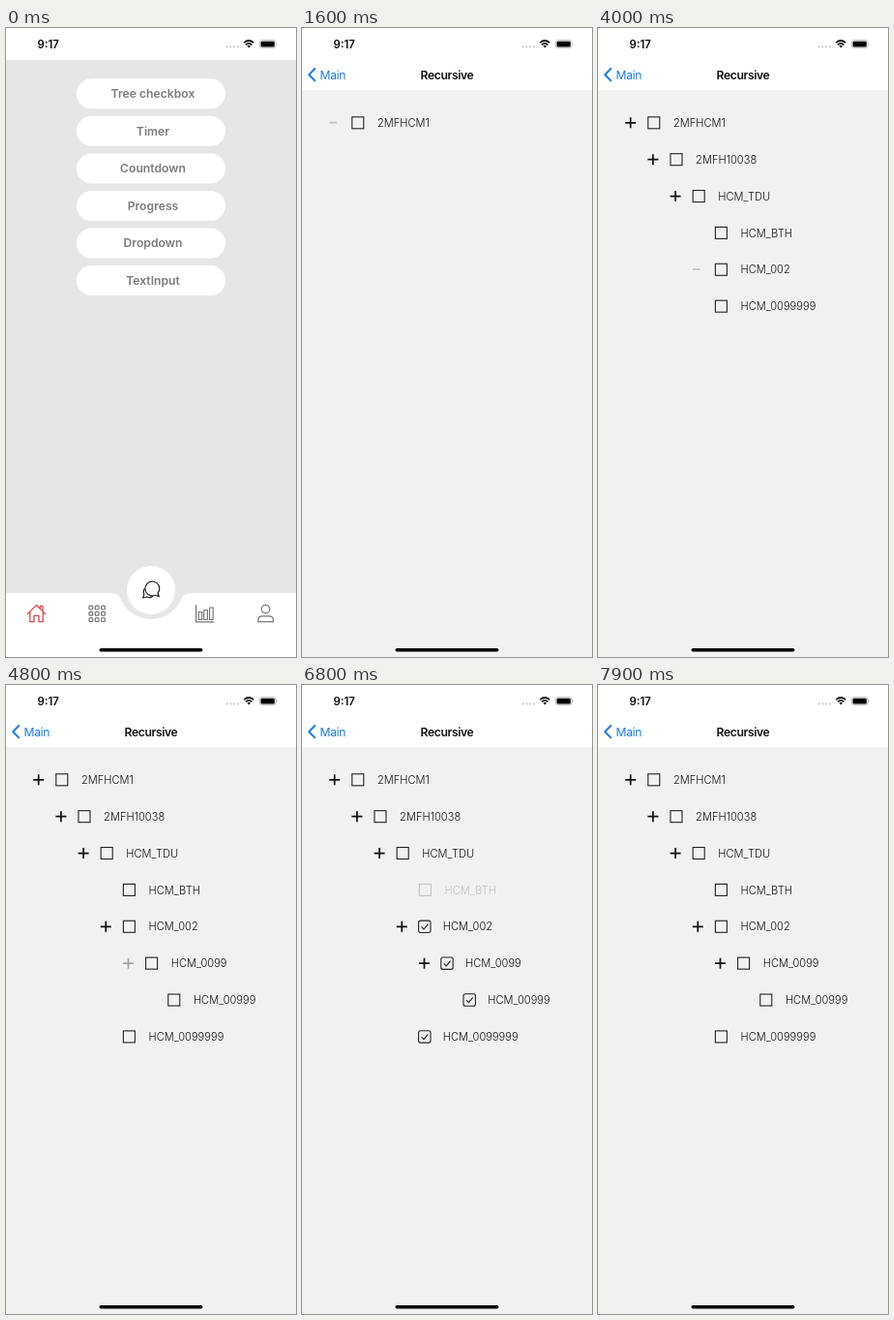
Recreate the animation shown at these times as an HTML page. Size 300x649 px, loop 8000 ms.

```html
<!DOCTYPE html>
<html lang="en">
<head>
<meta charset="utf-8">
<style>
  html, body { margin: 0; width: 100%; height: 100%; overflow: hidden; background: #fff; }
  svg { display: block; width: 300px; height: 649px; font-family: Inter, "Liberation Sans", sans-serif; }
  .line { fill: none; stroke-linecap: round; stroke-linejoin: round; }
  .button { font-size: 12.2px; font-weight: 600; fill: #7c7c7c; text-anchor: middle; }
  .nav { font-size: 12.2px; letter-spacing: -.4px; }
  .label { font-size: 11.1px; font-weight: 300; fill: #111; }
</style>
</head>
<body>
<svg viewBox="0 0 300 649">
  <rect width="300" height="649" fill="#fff"/>

  <g id="home">
    <rect y="33" width="300" height="616" fill="#e6e6e6"/>
    <g id="buttons"></g>
    <path fill="#fff" d="M0 583H108Q117 583 119.5 591A34 34 0 0 0 180.5 591Q183 583 192 583H300V649H0Z"/>
    <circle cx="150" cy="580" r="25" fill="#fff"/>
    <g class="line" stroke="#222" stroke-width="1.2">
      <path d="M147 584.4A7.4 7.4 0 1 1 157 583.2L158.4 586.4L154.4 585.2Q150.5 586.8 147 584.4"/>
      <path d="M143.4 578.4Q141.4 581.6 142.8 584.6L141.6 588L145.2 587Q149 588.6 151.6 586.6"/>
    </g>
    <g class="line" stroke="#e0434a" stroke-width="1.3">
      <path d="M22.3 604.6L31.5 595.4L40.7 604.6M24.8 602.6V612.6H29V606.4H34V612.6H38.2V602.6M35.4 599V596.4H38V601.4"/>
    </g>
    <g class="line" stroke="#777" stroke-width="1.2">
      <g id="grid"></g>
      <path d="M196.6 595.5V612.9H215M199.2 602.5h3.6v8h-3.6zM204.8 600.5h3.6v10h-3.6zM210.6 598h3.6v12.5h-3.6z"/>
      <circle cx="268.6" cy="599.6" r="4.3"/>
      <path d="M260.8 612.7V610.8Q261 606.8 265 606.8H272.2Q276.3 606.8 276.5 610.8V612.7Z"/>
    </g>
  </g>

  <g id="tree">
    <rect y="64" width="300" height="585" fill="#f1f1f1"/>
    <path class="line" d="M13.3 42L7.2 48.2L13.3 54.4" stroke="#1a7cec" stroke-width="2"/>
    <text class="nav" x="18.6" y="52.8" fill="#1a7cec">Main</text>
    <text class="nav" x="150" y="52.6" font-weight="600" text-anchor="middle" fill="#111">Recursive</text>
    <g id="rows"></g>
  </g>

  <text x="32.6" y="21" font-size="11.4" font-weight="600" fill="#111">9:17</text>
  <g fill="#c4c4c4">
    <circle cx="228.5" cy="19.6" r="1"/><circle cx="232.3" cy="19.6" r="1"/>
    <circle cx="236.1" cy="19.6" r="1"/><circle cx="239.9" cy="19.6" r="1"/>
  </g>
  <g fill="none" stroke="#111" stroke-width="1.7">
    <path d="M246.2 15.2Q251.2 10.8 256.2 15.2M248 17.3Q251.2 14.6 254.4 17.3"/>
    <path d="M249.4 18.5L251.2 20.4L253 18.5Q251.2 17.2 249.4 18.5Z" fill="#111" stroke="none"/>
  </g>
  <rect x="262.4" y="12.6" width="16.6" height="8" rx="2.2" fill="none" stroke="#aaa" stroke-width=".8"/>
  <rect x="263.6" y="13.8" width="14.2" height="5.6" rx="1.2" fill="#000"/>
  <path d="M280 15.2Q281.3 16.6 280 18Z" fill="#aaa"/>
  <rect x="96.5" y="640" width="107" height="3.6" rx="1.8" fill="#000"/>
</svg>

<script>
const LOOP = 8000, STEP = 100, HOME_END = 500, CLEAR = 7700;
const $ = id => document.getElementById(id);

// open and tap hold [press, release] times; check is when the box gets its tick
const rows = [
  { label: '2MFHCM1', depth: 0, shown: 500, open: [1600, 1700], check: 6900, tap: [7500, 7700] },
  { label: '2MFH10038', depth: 1, shown: 1700, open: [2300, 2400], check: 6900 },
  { label: 'HCM_TDU', depth: 2, shown: 2400, open: [3100, 3300], check: 6900 },
  { label: 'HCM_BTH', depth: 3, shown: 3300, check: 6900, tap: [6800, 6900] },
  { label: 'HCM_002', depth: 3, shown: 3300, open: [4000, 4100], check: 6000, tap: [5900, 6000] },
  { label: 'HCM_0099', depth: 4, shown: 4100, open: [4600, 4800], check: 6000 },
  { label: 'HCM_00999', depth: 5, shown: 4800, check: 6000 },
  { label: 'HCM_0099999', depth: 3, shown: 3300, check: 5600, tap: [5500, 5600] }
];

$('buttons').innerHTML = ['Tree checkbox', 'Timer', 'Countdown', 'Progress', 'Dropdown', 'TextInput']
  .map((name, i) => {
    const y = 67.8 + i * 38.55;
    return `<rect x="73" y="${y - 15.5}" width="154" height="31" rx="15.5" fill="#fff"/>
      <text class="button" x="152" y="${y + 4.4}">${name}</text>`;
  }).join('');

$('grid').innerHTML = Array.from({ length: 9 }, (_, i) =>
  `<rect x="${86 + i % 3 * 6.3}" y="${596.2 + Math.floor(i / 3) * 6.2}" width="3.8" height="3.8" rx="1"/>`).join('');

// Touch feedback: dim while pressed, then fade back
function opacity(t, span) {
  if (!span || t < span[0]) return 1;
  if (t < span[1]) return .22;
  return Math.min(1, .35 + (t - span[1]) / 250);
}

function drawRow(row, i, t) {
  const x = row.depth * 23.2, y = 97.8 + i * 37.87;
  const checked = t >= row.check && t < CLEAR;
  const sign = t >= row.open?.[1] ? 'M28.2 0H39.2M33.7 -5.5V5.5' : 'M28.4 -.2H36';
  const toggle = row.open
    ? `<path d="${sign}" stroke="#111" stroke-width="1.7" opacity="${opacity(t, row.open)}"/>` : '';
  const box = checked
    ? '<rect x="51" y="-6.2" width="12.4" height="12.4" rx="2"/><path d="M54 .2L56.4 2.7L60.8 -2.6"/>'
    : '<rect x="51.8" y="-6" width="12" height="12"/>';
  return `<g transform="translate(${x} ${y})">${toggle}
    <g opacity="${opacity(t, row.tap)}">
      <g fill="none" stroke="#222" stroke-width="1.1">${box}</g>
      <text class="label" x="${checked ? 76.2 : 77.9}" y="4.2">${row.label}</text>
    </g></g>`;
}

let last = -1;
function frame(now) {
  const t = Math.floor(now % LOOP / STEP) * STEP;
  if (t !== last) {
    last = t;
    const home = t < HOME_END;
    $('home').style.display = home ? '' : 'none';
    $('tree').style.display = home ? 'none' : '';
    $('rows').innerHTML = rows.filter(r => t >= r.shown).map((r, i) => drawRow(r, i, t)).join('');
  }
  requestAnimationFrame(frame);
}
frame(performance.now());
</script>
</body>
</html>
```
